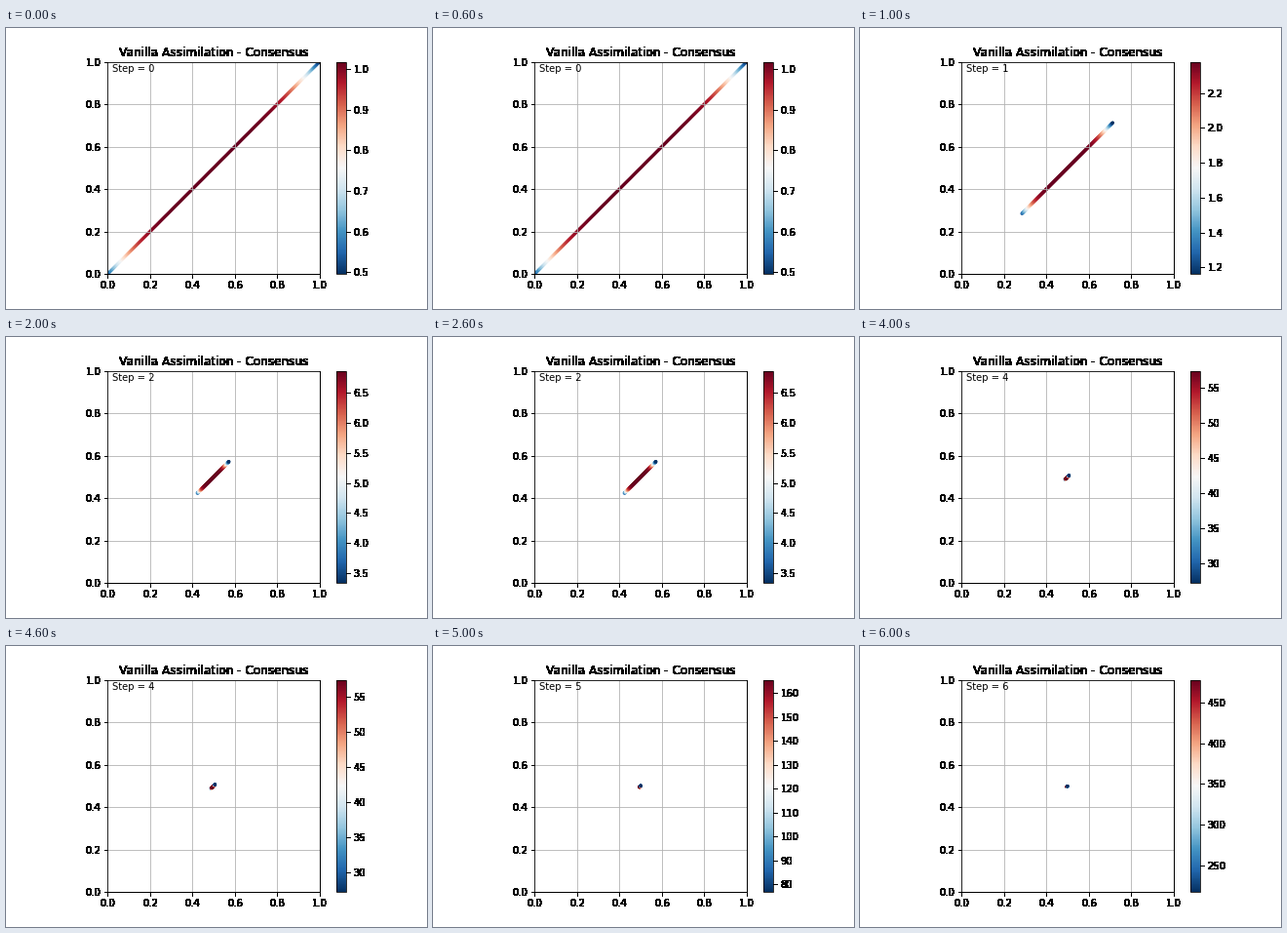
Animation, 432 px wide and 288 px high, one loop 7000 ms. Source, as a matplotlib script:

```python
import math

import matplotlib.pyplot as plt
import numpy as np
from matplotlib.animation import FuncAnimation
from matplotlib.colors import Normalize
from matplotlib.ticker import MultipleLocator

plt.rcParams.update({
    "font.family": "DejaVu Sans",
    "font.size": 10,
    "figure.subplot.bottom": 0.125,
})

AGENTS = 200
CENTER = 0.497
BANDWIDTH = 0.11

# Density range and colorbar tick spacing at each step
LOW = [0.496, 1.163, 3.337, 9.57, 27.2, 76.7, 216.9]
HIGH = [1.018, 2.379, 6.873, 19.86, 57.4, 165.7, 478.8]
TICK_STEP = [0.1, 0.2, 0.5, 2, 5, 10, 50]


def normal_cdf(values):
    return np.array([0.5 * (1 + math.erf(v / math.sqrt(2))) for v in values])


def harden(image, dpi):
    """Turn every touched pixel into solid black."""
    image[..., :3] = 0
    image[..., 3] = image[..., 3] > 0
    return image, 0, 0


def harden_axis(axis):
    for artist in [*axis.get_ticklabels(), *axis.get_ticklines()]:
        artist.set_agg_filter(harden)


opinions = np.linspace(0, 1, AGENTS)
density = (normal_cdf((opinions + 0.012) / BANDWIDTH)
           * normal_cdf((1 - opinions) / BANDWIDTH))
density = (density - density.min()) / np.ptp(density)

fig, ax = plt.subplots(figsize=(6, 4), dpi=72, facecolor="white")
dots = ax.scatter(opinions, opinions, c=density, s=12,
                  cmap="RdBu_r", edgecolors="none")
cbar = fig.colorbar(dots, ax=ax)
ax.set(xlim=(0, 1), ylim=(0, 1), aspect="equal")
ax.grid(True)
title = ax.set_title("Vanilla Assimilation - Consensus")
label = ax.text(0.02, 0.95, "")

for artist in (title, ax.spines["bottom"], ax.spines["right"]):
    artist.set_agg_filter(harden)
harden_axis(ax.xaxis)
harden_axis(ax.yaxis)


def update(step):
    low, high = LOW[step], HIGH[step]
    x = CENTER + (opinions - CENTER) * HIGH[0] / high
    dots.set_offsets(np.column_stack([x, x]))
    dots.set_array(low + (high - low) * density)
    # A fresh norm changes both limits at once
    dots.set_norm(Normalize(low, high))

    spacing = TICK_STEP[step]
    cbar.set_ticks(MultipleLocator(spacing))
    cbar.ax.yaxis.set_major_formatter("{x:.1f}" if spacing < 1 else "{x:.0f}")
    harden_axis(cbar.ax.yaxis)

    label.set_text(f"Step = {step}")
    return dots, label


anim = FuncAnimation(fig, update, frames=len(HIGH), interval=1000,
                     repeat=True, repeat_delay=0)
plt.show()
```
